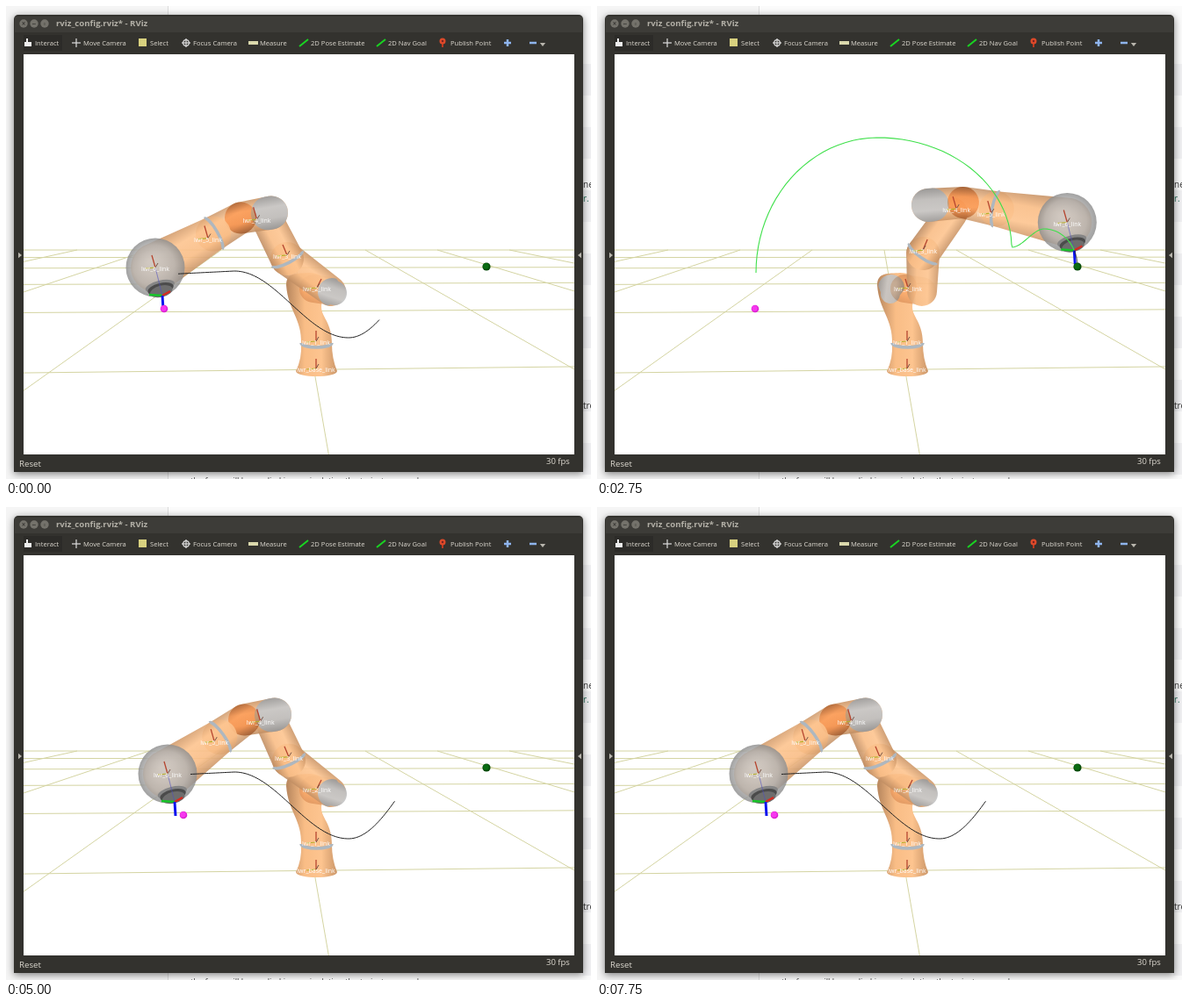
An HTML page with a canvas for the animation above (8000 ms loop, 666 by 539 pixels).

```html
<!DOCTYPE html>
<html lang="en">
<head>
<meta charset="utf-8">
<title>Robot arm planner</title>
<style>
html, body { margin: 0; width: 100%; height: 100%; overflow: hidden; background: #fff; }
canvas { display: block; }
</style>
</head>
<body>
<canvas id="stage" width="666" height="539"></canvas>
<script>
const ctx = document.getElementById('stage').getContext('2d');
const LOOP = 8000, STEP = 250, GOAL = [547, 297];
const ORANGE = ['#bd8b61', '#f9bd86', '#fdc48f', '#c99466'];
const GREY = ['#999', '#c0c0c0', '#c8c8c8', '#a0a0a0'];
const RING = '#aeb7bf';

const lerp = (a, b, k) => a + (b - a) * k;
const mix = (a, b, k) => a.map((v, i) => lerp(v, b[i], k));
const add = ([x, y], dx, dy) => [x + dx, y + dy];
const ramp = (v, from, to) => Math.max(0, Math.min(1, (v - from) / (to - from)));
const smooth = k => k * k * (3 - 2 * k);

// Each path runs rest, start, apex, via, hump, goal; every leg takes legMs.
const trials = [
  { from: 0, go: 0, legMs: 583, pink: [180, 345],
    path: [[178, 330], [181, 304], [320, 150], [472, 275], [509, 254], GOAL] },
  { from: 3000, go: 3500, legMs: 333, pink: [208, 345],
    path: [[206, 333], [214, 313], [290, 234], [397, 376], [515, 250], GOAL] },
  { from: 5000, go: 5000, legMs: 250, pink: [202, 351],
    path: [[192, 336], [204, 306], [370, 125], [516, 233], [523, 245], GOAL] },
  { from: 6000, go: 6000, legMs: 250, pink: [202, 351], straight: true, bulge: 34,
    path: [[192, 336], [205, 338], [301, 147], [397, 215], [510, 155], GOAL] },
  { from: 7500, go: LOOP, legMs: 250, pink: [202, 351],
    path: [[192, 336], [205, 338], [301, 147], [397, 215], [510, 155], GOAL] }
];

// Quarter-ellipse rise and fall, an S-shaped climb, then a last fall to the goal.
function pathAt({ path, straight, bulge = 0 }, u) {
  const leg = Math.min(Math.floor(u), 4), k = u - leg;
  const [ax, ay] = path[leg], [bx, by] = path[leg + 1];
  const s = Math.sin(k * Math.PI / 2), c = 1 - Math.cos(k * Math.PI / 2);
  if (leg === 0 || (leg === 2 && straight)) return mix(path[leg], path[leg + 1], k);
  if (leg === 1) return [lerp(ax, bx, c), lerp(ay, by, s)];
  if (leg === 3) return [lerp(ax, bx, k), lerp(ay, by, straight ? s : smooth(k))];
  const swell = leg === 4 ? bulge * Math.max(0, Math.sin(k * Math.PI)) ** .7 : 0;
  return [lerp(ax, bx, s) + swell, lerp(ay, by, c)];
}

const sample = (from, to, at, n = 90) =>
  Array.from({ length: n + 1 }, (_, i) => at(lerp(from, to, i / n)));

// All joints follow from where the tool is.
function armPose(tool) {
  const [x, y] = tool, reach = x - 178;
  const lift = ramp(y, 200, 150), turned = smooth(ramp(x, 380, 460));
  const elbow = [298 + reach * .29 + 20 * lift, 190 + y * .165];
  const root = add(elbow, lerp(-31, 13, turned), lerp(-3, -12, turned));
  const wrist = add(tool, lerp(-8, 5, lift), -32 + 5 * lift);
  return {
    elbow, root, wrist, tool,
    side: ramp(x, 330, 380),
    waist: [320 + reach * .14 + 10 * lift, 250 + y * .115],
    cap: add(elbow, lerp(4, -27, turned), -9),
    collar: mix(root, wrist, .32)
  };
}

function line(points, color, width = 1) {
  ctx.beginPath();
  points.forEach(p => ctx.lineTo(...p));
  ctx.strokeStyle = color;
  ctx.lineWidth = width;
  ctx.stroke();
}

function dot(p, r, color) {
  ctx.beginPath();
  ctx.arc(...p, r, 0, 7);
  ctx.fillStyle = color;
  ctx.fill();
}

function rect(x, y, w, h, color) {
  ctx.fillStyle = color;
  ctx.fillRect(x, y, w, h);
}

function triangle(x, y, dx, dy) {
  ctx.beginPath();
  ctx.moveTo(x + dx, y + dy);
  ctx.lineTo(x - dy * .8, y - dx * .8);
  ctx.lineTo(x + dy * .8, y + dx * .8);
  ctx.fillStyle = '#b8b5ad';
  ctx.fill();
}

function label(text, x, y, size, color, weight = '', align = 'left') {
  ctx.font = `${weight} ${size}px "Open Sans", sans-serif`;
  ctx.textAlign = align;
  ctx.fillStyle = color;
  ctx.fillText(text, x, y);
}

function shade(x0, y0, x1, y1, colors) {
  const g = ctx.createLinearGradient(x0, y0, x1, y1);
  colors.forEach((c, i) => g.addColorStop(i / 3, c));
  return g;
}

function tube(a, b, ra, rb, { colors = ORANGE, alpha = .9, blend = 'source-over' } = {}) {
  const ang = Math.atan2(b[1] - a[1], b[0] - a[0]), q = Math.PI / 2;
  const r = Math.max(ra, rb), nx = -Math.sin(ang) * r, ny = Math.cos(ang) * r;
  ctx.save();
  ctx.globalAlpha = alpha;
  ctx.globalCompositeOperation = blend;
  ctx.beginPath();
  ctx.arc(...a, ra, ang + q, ang - q);
  ctx.arc(...b, rb, ang - q, ang + q);
  ctx.fillStyle = shade(a[0] - nx, a[1] - ny, a[0] + nx, a[1] + ny, colors);
  ctx.fill();
  ctx.restore();
}

function ball([x, y], r, alpha) {
  const g = ctx.createRadialGradient(x - r * .15, y - r * .2, r * .1, x, y, r);
  ['#c8c8c8', '#bfbfbf', '#b2b2b2', '#8f8f8f'].forEach((c, i) => g.addColorStop(i / 3, c));
  ctx.save();
  ctx.globalAlpha = alpha;
  dot([x, y], r, g);
  ctx.restore();
}

function ring([x, y], toward, r) {
  const ang = Math.atan2(toward[1] - y, toward[0] - x);
  ctx.beginPath();
  ctx.ellipse(x, y, 5, r, ang, Math.PI / 2, -Math.PI / 2);
  ctx.strokeStyle = RING;
  ctx.lineWidth = 3.5;
  ctx.stroke();
}

function axes([x, y], name, lean = -4, up = 14) {
  line([[x, y], [x - 11, y + 1]], '#b8ae2a', 1.2);
  line([[x, y], [x + lean, y - up]], '#b5452f', 1.3);
  line([[x, y], [x + 3, y - 5]], '#775548');
  label(name, x, y + 4, 7, '#fff', '', 'center');
}

function base() {
  ctx.fillStyle = shade(321, 0, 378, 0, ORANGE);
  ctx.beginPath();
  ctx.moveTo(330, 416);
  ctx.quadraticCurveTo(337, 402, 336, 385);
  ctx.bezierCurveTo(337, 356, 321, 347, 319, 318);
  ctx.bezierCurveTo(319, 303, 332, 305, 345, 304);
  ctx.bezierCurveTo(367, 304, 367, 322, 360, 336);
  ctx.bezierCurveTo(355, 354, 371, 356, 371, 385);
  ctx.quadraticCurveTo(371, 402, 377, 416);
  ctx.bezierCurveTo(376, 424, 331, 424, 330, 416);
  ctx.fill();
  ring([353.5, 384], [353.5, 300], 17.5);
}

function toolHead(wrist, [x, y], tip) {
  const ang = Math.atan2(y - wrist[1], x - wrist[0]) - Math.PI / 2;
  ['#858585', '#4b4b4b', '#6d6d6d'].forEach((color, i) => {
    const back = 11 - 3 * i;
    ctx.beginPath();
    ctx.ellipse(x + Math.sin(ang) * back, y - Math.cos(ang) * back, 17 - 2 * i, 6.5, ang, 0, 7);
    ctx.fillStyle = color;
    ctx.fill();
  });
  line([wrist, [x, y]], 'rgba(80,80,190,.6)');
  line([[x, y], [x - 15, y - 1]], '#16c528', 2.5);
  line([[x, y], [x + 9, y - 5]], '#d82a20', 2.5);
  line([[x, y], tip], '#0b13ef', 3);
}

function arm({ elbow, root, wrist, tool, side, waist, cap, collar }) {
  const shoulder = [370, 325];
  base();
  tube([335, 321], [334, 328], 15, 11, { colors: GREY, alpha: side * .9 });
  tube([350, 322], shoulder, 16, 16, { alpha: .45, blend: 'multiply' });
  tube(shoulder, waist, 17, 19);
  tube([371, 326], [374, 327], 16, 14, { colors: GREY, alpha: (1 - side) * .95 });
  tube(waist, elbow, 19, 18);
  ring(waist, elbow, 19);
  tube(cap, root, 19, 18);
  tube(cap, mix(cap, root, .12), 19, 19, { colors: GREY, alpha: .95 });
  tube(root, collar, 18, 20, { alpha: .85, blend: 'multiply' });
  tube(collar, wrist, 20, 28);
  ring(collar, wrist, 20);
  ball(wrist, 33.5, .84);
  toolHead(wrist, tool, add(tool, 1, 16));

  axes([353, 413], 'lwr_base_link', 0, 11);
  axes([353, 382], 'lwr_1_link', 0, 12);
  axes([354, 321], 'lwr_2_link', lerp(5, -3, side), 10);
  axes(add(waist, 0, -4), 'lwr_3_link', lerp(-5, 5, side), 12);
  axes(mix(elbow, root, .4), 'lwr_4_link');
  axes(add(collar, -6, 5), 'lwr_5_link');
  axes(wrist, 'lwr_6_link');
}

// Perspective floor: rows are evenly spaced in depth, columns share a vanishing point.
function grid() {
  const color = '#d4d4a2', vx = 318, vy = 226;
  for (let i = 0; i < 6; i++) {
    const y = 230 + 1 / (.00542 + .00308 * i), tilt = (y - 278) * .026;
    line([[20, y + tilt], [647, y - tilt]], color);
  }
  for (let i = -3; i <= 3; i++) {
    const x = 327 + 82 * i;
    line([[x, 278], [vx + (x - vx) * 8, vy + 52 * 8]], color);
  }
}

// First guess of the planner: a flat run, a dip, then a steeper way up.
function draftPlan([x, y]) {
  return sample(x + 18, 425 + (x - 178) * 1.25, px => {
    const rise = 38 + 38 * Math.cos(Math.PI * (Math.max(px, 260) - 260) / 130);
    return [px, 378 - rise * (px > 390 ? 1.6 : 1) + Math.max(0, 260 - px) * .05];
  });
}

const icons = {
  hand(x) { rect(x + 1, 41, 8, 5, '#eee'); rect(x + 3, 37, 2, 5, '#eee'); },
  cross(x) {
    line([[x, 42], [x + 10, 42]], '#ddd', 1.2);
    line([[x + 5, 37], [x + 5, 47]], '#ddd', 1.2);
  },
  select(x) { rect(x, 37, 9, 9, '#d8d17f'); },
  focus(x) {
    icons.cross(x);
    ctx.beginPath();
    ctx.arc(x + 5, 42, 3.3, 0, 7);
    ctx.stroke();
  },
  ruler(x) { rect(x, 40, 11, 4, '#dad8ac'); },
  arrow(x) { line([[x, 46], [x + 10, 38]], '#19d522', 2); },
  pin(x) {
    line([[x + 4, 42], [x + 4, 47]], '#bb3a20', 2);
    dot([x + 4, 40], 3.5, '#dd4a2a');
    dot([x + 4, 40], 1.2, '#722');
  }
};

const tools = [['Interact', 20, 'hand'], ['Move Camera', 75, 'cross'], ['Select', 151, 'select'],
  ['Focus Camera', 200, 'focus'], ['Measure', 276, 'ruler'], ['2D Pose Estimate', 334, 'arrow'],
  ['2D Nav Goal', 422, 'arrow'], ['Publish Point', 493, 'pin']];

function page() {
  rect(0, 0, 666, 539, '#f5f5f5');
  rect(184, 0, 482, 539, '#fbfbfb');
  rect(184, 0, 1, 539, '#dcdcdc');
  for (let y = 66; y < 500; y += 72) rect(656, y, 10, 36, '#f0f0f2');
  label('ne', 657, 207, 10, '#333');
  label('r.', 657, 223, 10, '#28705a');
  label('tro', 657, 459, 10, '#333');
  label('the force will be applied in manipulation the trajectory may be one', 210, 544, 9.3, '#444');
}

function windowFrame() {
  ctx.save();
  ctx.shadowColor = 'rgba(0,0,0,.5)';
  ctx.shadowBlur = 9;
  ctx.shadowOffsetY = 2;
  ctx.fillStyle = '#33322e';
  ctx.beginPath();
  ctx.roundRect(9, 10, 648, 521, [5, 5, 0, 0]);
  ctx.fill();
  ctx.restore();
  rect(10, 12, 646, 18, '#3d3c38');
  ['×', '−', '▫'].forEach((sign, i) => {
    dot([20 + 12 * i, 20], 4.7, '#74726b');
    label(sign, 20 + 12 * i, 23, 8, '#3d3c38', 'bold', 'center');
  });
  label('rviz_config.rviz* - RViz', 57, 23, 9.6, '#b3b0a7', 'bold');
  rect(20, 33, 44, 18, '#2c2b28');
  tools.forEach(([text, x, icon]) => {
    icons[icon](x);
    label(text, x + 13, 45, 7.6, '#dfdbd2');
  });
  line([[567, 42], [575, 42]], '#8fb4ee', 2.5);
  line([[571, 38], [571, 46]], '#8fb4ee', 2.5);
  line([[596, 42], [604, 42]], '#8fb4ee', 2.5);
  triangle(611, 42, 0, 4);
  rect(20, 55, 627, 456, '#fff');
  triangle(14, 284, 4, 0);
  triangle(655, 284, -4, 0);
  label('Reset', 15, 525, 9.7, '#dfdbd2');
  label('30 fps', 615, 522, 9.5, '#dfdbd2');
}

function draw(t) {
  const trial = trials.filter(s => s.from <= t).pop();
  const u = 5 * ramp(t, trial.go, trial.go + 5 * trial.legMs);
  const at = v => pathAt(trial, v), tool = at(u);
  page();
  windowFrame();
  ctx.save();
  ctx.beginPath();
  ctx.rect(20, 55, 627, 456);
  ctx.clip();
  grid();
  arm(armPose(tool));
  const draft = draftPlan(tool), rest = sample(u, 5, at);
  line(draft.map((p, i) => mix(p, rest[i], ramp(u, 0, 1))), '#222');
  if (u > 1) line(sample(1, u, at), '#3fe04b', 1.1);
  dot(trial.pink, 4.3, '#dc22d2');
  dot(add(trial.pink, -.5, -.5), 3.2, '#f637ef');
  dot(GOAL, 4.6, '#064b0a');
  dot(add(GOAL, -.5, -.5), 3.2, '#0b6c12');
  ctx.restore();
}

function frame(now) {
  draw(Math.floor((now % LOOP) / STEP) * STEP);
  requestAnimationFrame(frame);
}
draw(0);
requestAnimationFrame(frame);
</script>
</body>
</html>
```
